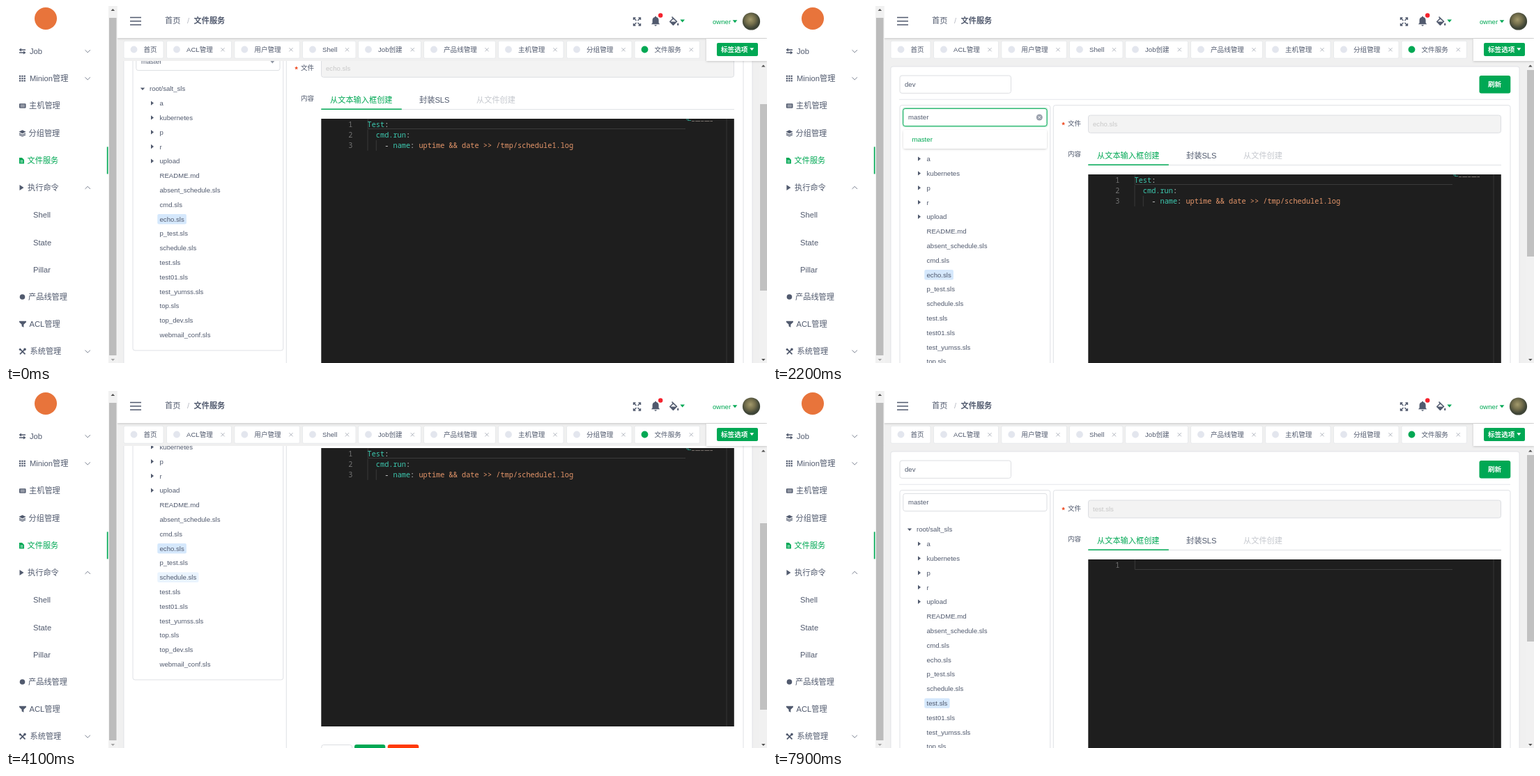
These frames come from a looping animation (1092x513 px, 8 s). An HTML page:

```html
<!DOCTYPE html>
<html lang="zh-CN">
<head>
<meta charset="utf-8">
<title>文件服务</title>
<style>
html, body { margin: 0; width: 100%; height: 100%; overflow: hidden; background: #fff; }
svg { display: block; width: 1092px; height: 513px; font-family: "Liberation Sans", "Noto Sans CJK SC", "Noto Sans CJK", sans-serif; }
.mono { font-family: "Noto Sans Mono", "DejaVu Sans Mono", monospace; white-space: pre; }
</style>
</head>
<body>
<script>
const GREEN = '#00a854', INK = '#515a6e', LINE = '#dcdee2', PAGE = '#f0f0f0';
const LOOP = 8000, ROW = 20.8, TREE_TOP = 199;

const text = (x, cy, str, size = 9.6, fill = INK, extra = '') =>
  `<text x="${x}" y="${(cy + size * .36).toFixed(2)}" font-size="${size}" fill="${fill}" ${extra}>${str}</text>`;
const box = (x, y, x2, y2, fill, stroke = 'none', r = 0, extra = '') =>
  `<rect x="${x}" y="${y}" width="${x2 - x}" height="${y2 - y}" rx="${r}" fill="${fill}" stroke="${stroke}" ${extra}/>`;
const path = (d, stroke = INK, width = 1, fill = 'none') =>
  `<path d="${d}" stroke="${stroke}" stroke-width="${width}" fill="${fill}"/>`;
const shape = (d, fill = INK) => `<path d="${d}" fill="${fill}"/>`;
const dot = (x, y, r, fill) => `<circle cx="${x}" cy="${y}" r="${r}" fill="${fill}"/>`;
const caret = (x, y, w, h, fill) => shape(`M${x - w},${y - h}h${2 * w}l${-w},${2 * h}z`, fill);
const group = (id, body, extra = '') => `<g id="${id}" ${extra}>${body}</g>`;

// Sidebar
const icons = {
  swap: y => path(`M20,${y - 2}h8M19,${y + 2}h8`, INK, 1.3) +
    shape(`M22,${y - 4.5}v5l-3.5,-2.5zM25,${y - .5}v5l3.5,-2.5z`),
  grid: y => [0, 1, 2].map(i => [0, 1, 2].map(j =>
    box(19 + i * 3.3, y - 4.5 + j * 3.3, 21.2 + i * 3.3, y - 2.3 + j * 3.3, INK)).join('')).join(''),
  keys: y => box(19, y - 3.2, 28.5, y + 3.2, INK, 'none', .8) +
    path(`M20.5,${y - 1}h6.5M20.5,${y + 1.3}h6.5`, '#fff', .8, 'none'),
  layers: y => shape(`M23.5,${y - 4.5}l5,2.6l-5,2.6l-5,-2.6z`) +
    path(`M19,${y + .4}l4.5,2.2l4.5,-2.2M19,${y + 2.4}l4.5,2.2l4.5,-2.2`, INK, 1.1),
  doc: y => shape(`M19,${y - 4}h4l3,3v5.5h-7z`, GREEN) + path(`M20.5,${y + .3}h4M20.5,${y + 2.3}h4`, '#fff', .8),
  play: y => shape(`M19.5,${y - 4}l6,4l-6,4z`),
  round: y => dot(23.5, y, 3.8, INK),
  funnel: y => shape(`M19,${y - 4.5}h10v1.5l-3.6,3.6v4l-2.8,-1.6v-2.4l-3.6,-3.6z`),
  tools: y => path(`M20,${y + 4}l7,-7M20,${y - 3.5}l7.5,7.5`, INK, 1.7) + dot(27, y - 3, 1.8, INK) + dot(20.2, y - 3, 1.5, INK)
};
const menu = [
  ['Job', 34, 'swap', 1], ['Minion管理', 34, 'grid', 1], ['主机管理', 33, 'keys'], ['分组管理', 32.5, 'layers'],
  ['文件服务', 30.5, 'doc'], ['执行命令', 31, 'play', -1], ['Shell', 39], ['State', 39], ['Pillar', 39],
  ['产品线管理', 32, 'round'], ['ACL管理', 33.5, 'funnel'], ['系统管理', 34.5, 'tools', 1]
];
const sidebar = box(0, 0, 147, 513, '#fff') + dot(57, 18, 16, '#e8743b') +
  menu.map(([label, x, icon, fold], i) => {
    const y = 65 + 39.22 * i, active = i === 4;
    return (icon ? icons[icon](y) : '') + text(x, y, label, 11.2, active ? GREEN : INK) +
      (fold ? path(`M113.5,${y - 1.8 * fold}l3.7,${3.6 * fold}l3.7,${-3.6 * fold}`, '#7b8291') : '') +
      (active ? box(144.8, y - 19.5, 146.5, y + 19.5, GREEN) : '');
  }).join('') +
  box(147, 0, 159.5, 513, '#f1f1f1') + box(148, 17, 158.5, 502, '#bcbcbc') +
  caret(153.3, 5.5, 2.8, -1.5, '#505050') + caret(153.3, 508.5, 2.8, 1.5, '#a3a3a3');

// Header and page tabs
const tabs = [
  ['首页', 169, 226], ['ACL管理', 230.5, 323.5, 311], ['用户管理', 327.8, 421.5, 409], ['Shell', 425.5, 502, 489.5],
  ['Job创建', 505.5, 595.5, 583.3], ['产品线管理', 599.5, 702.5, 690], ['主机管理', 706.5, 800, 788],
  ['分组管理', 804.5, 898, 886], ['文件服务', 902, 995.5, 983.3]
];
const header = box(159.5, 0, 1092, 79, PAGE) +
  box(159.5, 0, 1092, 46, '#fff', 'none', 0, 'filter="url(#soft)"') +
  path('M178,16.5h16M178,21.7h16M178,27h16', INK, 1.5) +
  text(228, 21, '首页', 11.2) + text(260, 21, '/', 11.2, '#b5b9c2') +
  text(269.5, 21, '文件服务', 11.2, INK, 'font-weight="bold"') +
  path('M900.5,20v-3h3M907.5,17h3v3M910.5,25v3h-3M903.5,28h-3v-3M901,17.5l3.5,3.5M910,17.5l-3.5,3.5M901,27.5l3.5,-3.5M910,27.5l-3.5,-3.5', INK, 1.4) +
  shape('M926,26.3l1.6,-2v-4q0,-3.6 3.4,-4.4a1.1,1.1 0 0 1 2.2,0q3.4,.8 3.4,4.4v4l1.6,2zM930.4,27.2h3.4q-.3,1.6 -1.7,1.6t-1.7,-1.6z') +
  dot(939.2, 13.5, 3.2, '#f5222d') +
  shape('M955,16l1,-1l7.5,7.3l-5.5,5.4q-.6,.5 -1.2,0l-4.6,-4.6q-.5,-.6 0,-1.2l4.2,-4.2zM964.2,24q1.6,2 1.2,3.2a1.3,1.3 0 0 1 -2.4,0q-.3,-1.2 1.2,-3.2z') +
  path('M954.2,22.3h6.8l-3.4,-3.4z', '#fff', .4, '#fff') +
  caret(970.7, 21.5, 3.3, 2, GREEN) +
  text(1014, 23, 'owner', 9.6, GREEN) + caret(1046, 22.2, 3.3, 2, GREEN) +
  dot(1069.5, 22, 12.6, 'url(#avatar)') +
  tabs.map(([label, x, x2, close], i) => {
    return box(x, 50.2, x2, 75.2, '#fff', '#e8eaec', 2) + dot(x + 14.5, 62.5, 4.9, i === 8 ? GREEN : '#e3e6ee') +
      text(x + 28.5, 62.7, label) +
      (close ? path(`M${close - 2.6},60.1l5.2,5.2m0,-5.2l-5.2,5.2`, '#a0a5b0', .8) : '');
  }).join('') +
  box(1005, 47, 1092, 79, '#fff', 'none', 0, 'filter="url(#soft)"') +
  box(1020, 53, 1079, 72, GREEN, 'none', 2) +
  text(1026, 62.5, '标签选项', 9.6, '#fff', 'font-weight="bold"') + caret(1070.3, 62.2, 3, 1.9, '#fff');

// Scrolled content, laid out at scroll position 0
const files = ['a', 'kubernetes', 'p', 'r', 'upload', 'README.md', 'absent_schedule.sls', 'cmd.sls', 'echo.sls',
  'p_test.sls', 'schedule.sls', 'test.sls', 'test01.sls', 'test_yumss.sls', 'top.sls', 'top_dev.sls', 'webmail_conf.sls'];
const rowY = name => TREE_TOP + ROW * (files.indexOf(name) + 1);
const tree = caret(196, 199.3, 3.2, 1.8, INK) + text(206, TREE_TOP, 'root/salt_sls') +
  files.map((name, i) => {
    const y = rowY(name);
    return (i < 5 ? shape(`M208,${y - 3.4}l4,3.2l-4,3.2z`) : '') + text(220.5, y, name, 9.6, INK, `data-file="${name}"`);
  }).join('');

const code = (y, str) => text(518.5, y, str, 10.27, '#d4d4d4', 'class="mono" xml:space="preserve"');
const key = s => `<tspan fill="#3dc9b0">${s}</tspan>`;
const lineNo = (n, y) => text(497.5, y, n, 10.27, '#737373', 'class="mono" text-anchor="end"');
const script =
  code(249.8, key('Test') + ':') + code(265, '  ' + key('cmd.run') + ':') +
  code(280.2, '    - ' + key('name') + ': <tspan fill="#e5966a">uptime &amp;&amp; date &gt;&gt; /tmp/schedule1.log</tspan>') +
  lineNo(2, 265) + lineNo(3, 280.2) +
  path('M519,257.5v30.4M531.3,272.7v15.2', '#404040', .8) +
  path('M976,243h4M978,244.5h5', '#2c8f7f', 1) + path('M984,245.5h30', '#77706b', 1, 'none" stroke-dasharray="4 1.2 7 1');
const editor = box(452.3, 242, 1044.8, 642, '#1e1e1e') +
  path('M519.3,242.5v14H975', '#3a3a3a', 1) + path('M1034,242v400', '#3c3c3c', .8) +
  lineNo(1, 249.8) + group('script', script) +
  group('folds', path('M508,248.5l3,3l3,-3M508,263.7l3,3l3,-3', '#c5c5c5', 1)) +
  group('slider', box(1034.5, 242, 1044.8, 620, '#797979', 'none', 0, 'opacity=".4"'));

const content = box(169, 87, 1071, 731, '#fff', LINE, 3, 'stroke-width=".8"') +
  box(182, 100, 341.5, 125.3, '#fff', LINE, 3) + text(189, 112.8, 'dev') +
  box(1013.5, 100, 1058.3, 125.5, GREEN, 'none', 3) + text(1026, 112.8, '刷新', 9.6, '#fff', 'font-weight="bold"') +
  path('M181,134.3H1058', '#e3e5e9', .9) +
  box(182, 142.6, 397.8, 575, '#fff', LINE, 3, 'stroke-width=".9"') +
  box(402.3, 142.6, 1058, 715, '#fff', LINE, 3, 'stroke-width=".9"') +
  group('ring', box(186, 146.6, 394, 173.4, 'none', GREEN, 3.5, 'stroke-width="2" stroke-opacity=".2"')) +
  box(186.8, 147.4, 393, 172.6, '#fff', LINE, 3, 'id="select"') + text(194, 160, 'master') +
  group('arrow', caret(382.3, 160, 4, 2.4, '#8f96a3')) +
  group('clear', dot(382.3, 160, 4.5, '#9aa0ac') + path('M380.5,158.2l3.6,3.6m0,-3.6l-3.6,3.6', '#fff', .9)) +
  box(217.3, 0, 217.3, 14.4, '#d5e8fc', 'none', 2, 'id="picked"') +
  box(217.3, 0, 217.3, 14.4, '#eaf4fe', 'none', 2, 'id="hovered"') +
  tree +
  group('menu', box(187, 178, 393, 205, '#fff', 'none', 3, 'filter="url(#soft)"') + text(199.5, 192, 'master', 9.6, GREEN)) +
  text(414.5, 171, '*', 11, '#ed4014', 'font-weight="bold"') + text(423, 169, '文件') +
  box(452.5, 157, 1044.5, 182.3, '#f3f3f3', LINE, 3) + text(459, 170, '', 9.6, '#c8c8c8', 'id="fileName"') +
  text(423, 213, '内容') + path('M452,228.6H1045', LINE, .9) + path('M452.3,228.2H567.8', GREEN, 1.6) +
  text(465, 215, '从文本输入框创建', 11.2, GREEN) + text(593, 215, '封装SLS', 11.2) + text(675, 215, '从文件创建', 11.2, '#c5c8ce') +
  editor +
  box(452.8, 668.5, 496.5, 693, '#fff', LINE, 3) + box(500, 668, 544.3, 693.5, GREEN, 'none', 3) +
  box(547.7, 668, 592.3, 693.5, '#ff3a08', 'none', 3);

document.body.innerHTML = `<svg viewBox="0 0 1092 513">
<defs>
  <filter id="soft" x="-10%" y="-50%" width="120%" height="200%"><feDropShadow dx="0" dy="1" stdDeviation="1.6" flood-color="#000" flood-opacity=".18"/></filter>
  <radialGradient id="avatar" cx=".45" cy=".4"><stop offset="0" stop-color="#a39a6c"/><stop offset=".55" stop-color="#746f4c"/><stop offset="1" stop-color="#3f4537"/></radialGradient>
  <clipPath id="view"><rect x="160" y="78.5" width="922" height="434.5"/></clipPath>
</defs>
${box(159.5, 78, 1092, 513, PAGE)}
<g clip-path="url(#view)">${group('content', content)}</g>
${box(1081.5, 79, 1092, 513, '#f1f1f1')}${box(1082, 92, 1092, 360, '#c1c1c1', 'none', 0, 'id="thumb"')}
${caret(1086.8, 86, 2.8, -1.5, '#505050')}${caret(1086.8, 508.5, 2.8, 1.5, '#505050')}
${header}${sidebar}
</svg>`;

// Hard steps: [time, value]
const track = {
  scroll: [[0, 80], [1100, 25], [1200, 0], [3600, 38], [3700, 107], [3800, 152], [3900, 160], [7700, 156], [7800, 52], [7900, 0]],
  folds: [[0, 0], [400, 1], [500, 0]],
  slider: [[0, 0], [400, .6], [500, 1], [900, 0]],
  border: [[0, 0], [1600, .15], [1700, .7], [1800, 1], [3100, .85], [3200, .35], [3300, 0]],
  menu: [[0, 0], [2000, .35], [2100, .8], [2200, 1], [2700, .65], [2800, .2], [2900, 0]],
  arrow: [[0, 1], [1700, 0]],
  clear: [[0, 0], [1700, 1], [3100, 0]],
  hovered: [[0, ''], [4100, 'schedule.sls'], [4500, ''], [4900, 'cmd.sls'], [5300, ''], [5500, 'p_test.sls'], [6600, ''], [6700, 'test.sls'], [7100, '']],
  picked: [[0, 'echo.sls'], [7100, 'test.sls']],
  script: [[0, 1], [7200, 0]]
};
const at = (name, t) => track[name].findLast(([start]) => start <= t)[1];
const $ = id => document.getElementById(id);
const fade = (id, value) => $(id).setAttribute('opacity', value);

function mark(id, name) {
  fade(id, name ? 1 : 0);
  if (!name) return;
  const label = document.querySelector(`[data-file="${name}"]`);
  $(id).setAttribute('y', rowY(name) - 7.2);
  $(id).setAttribute('width', label.getComputedTextLength() + 6.4);
}

function mix(amount) {
  const from = [220, 222, 226], to = [0, 168, 84];
  return `rgb(${from.map((c, i) => Math.round(c + (to[i] - c) * amount))})`;
}

function draw(t) {
  const scroll = at('scroll', t), picked = at('picked', t);
  $('content').setAttribute('transform', `translate(0 ${-scroll})`);
  $('thumb').setAttribute('y', 92 + scroll * .6125);
  for (const id of ['folds', 'slider', 'menu', 'arrow', 'clear', 'script']) fade(id, at(id, t));
  fade('ring', at('menu', t));
  $('select').setAttribute('stroke', mix(at('border', t)));
  mark('picked', picked);
  mark('hovered', at('hovered', t));
  $('fileName').textContent = picked;
}

const start = performance.now();
function tick() {
  draw((performance.now() - start) % LOOP);
  requestAnimationFrame(tick);
}
tick();
</script>
</body>
</html>
```
